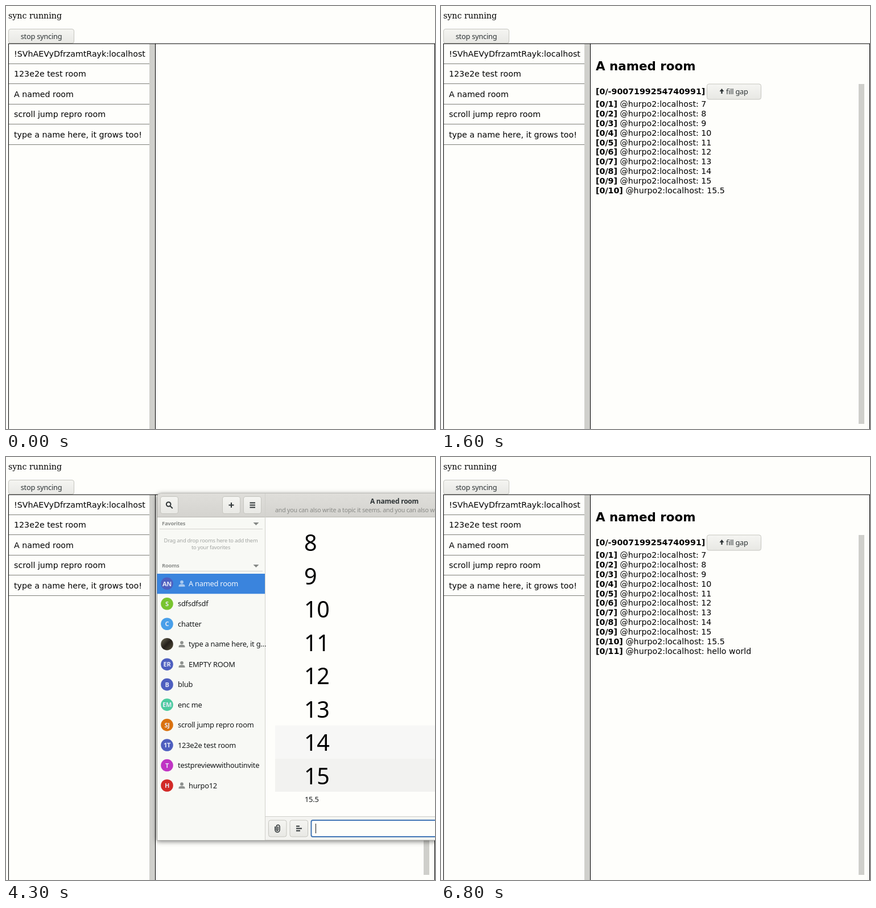
Animation, 754 px wide and 743 px high, one loop 8 s. Source, as an HTML page:

```html
<!DOCTYPE html>
<html lang="en">
<head>
<meta charset="utf-8">
<title>Room sync demo</title>
<style>
  html, body { margin: 0; width: 100%; height: 100%; overflow: hidden; background: #fefefb; }
  svg { display: block; width: 754px; height: 743px; }
  text { white-space: pre; }
  .page { font: 14.22px "DejaVu Sans", sans-serif; }
  .serif { font-family: "DejaVu Serif", serif; }
  .ui { font: 12.85px "Noto Sans", sans-serif; letter-spacing: -.018em; fill: #16191a; }
  .bold { font-weight: bold; }
  .mid { text-anchor: middle; }
  .shade { filter: drop-shadow(0 2.5px 4px rgba(0, 0, 0, .5)); }
  .icon { fill: none; stroke: #2e3436; stroke-width: 2; }
</style>
</head>
<body>
<svg id="stage" viewBox="0 0 754 743">
  <defs>
    <linearGradient id="face" x2="0" y2="1"><stop stop-color="#f5f5f2"/><stop offset="1" stop-color="#e8e8e4"/></linearGradient>
    <linearGradient id="bar" x2="0" y2="1"><stop stop-color="#dfdeda"/><stop offset="1" stop-color="#d4d3cf"/></linearGradient>
    <linearGradient id="photo" x2="1" y2="1"><stop stop-color="#6d6a55"/><stop offset=".5" stop-color="#26211c"/><stop offset="1" stop-color="#57523c"/></linearGradient>
    <clipPath id="messageArea"><path d="M456 106H754V631H456Z"/></clipPath>
  </defs>
</svg>
<script>
const LOOP = 8000;
const stage = document.getElementById('stage');

const rect = (x, y, w, h, fill, extra = '') =>
  `<rect x="${x}" y="${y}" width="${w}" height="${h}" fill="${fill}" ${extra}/>`;
const text = (x, y, content, cls = '', extra = '') =>
  `<text x="${x}" y="${y}" class="${cls}" ${extra}>${content}</text>`;
const size = (px, fill = '#16191a') => `style="font-size:${px}px;fill:${fill}"`;
const button = (x, y, w, h) =>
  rect(x + .5, y + .5, w - 1, h - 1, 'url(#face)', 'rx="3.5" stroke="#c5c5bf"');
const icon = d => `<path class="icon" d="${d}"/>`;
const group = (id, content, extra = '') => `<g id="${id}" ${extra}>${content}</g>`;

function page() {
  const rooms = ['!SVhAEVyDfrzamtRayk:localhost', '123e2e test room', 'A named room',
    'scroll jump repro room', 'type a name here, it grows too!'];
  return text(4, 22, 'sync running', 'serif') +
    button(4, 40, 116, 26) + text(62, 57.5, 'stop syncing', 'ui mid', size(12.8, '#2e3436')) +
    rooms.map((name, i) => text(14, 88.5 + 35.5 * i, name) +
      rect(5, Math.floor(101 + 35.5 * i), 247, 1, '#7e7f79')).join('') +
    rect(252, 67, 10, 676, '#cfcfcb') +
    rect(4, 65.7, 750, 1, '#000') +
    [4, 262, 753].map(x => rect(x, 66, 1, 677, '#000')).join('');
}

function timeline() {
  const bodies = ['7', '8', '9', '10', '11', '12', '13', '14', '15', '15.5', 'hello world'];
  const lines = bodies.map((body, i) => text(272, 177 + 16.88 * i,
    `<tspan class="bold">[0/${i + 1}]</tspan> @hurpo2:localhost: ${body}`, '',
    i === 10 ? 'id="newLine"' : ''));
  return text(272, 113, 'A named room', 'bold', 'font-size="21.4"') +
    text(272, 154.5, '[0/-9007199254740991]', 'bold') +
    button(467, 136.5, 96, 28) +
    '<path d="M493.5 145l4 5h-2.8v4h-2.4v-4h-2.8z" fill="#2e3436"/>' +
    text(501, 154.5, 'fill gap', 'ui', size(12.8, '#2e3436')) +
    rect(734, 137, 10, 597, '#cfcfcb') + lines.join('');
}

function sidebar() {
  const indigo = '#4e5fbf';
  const rooms = [
    ['AN', indigo, 'A named room', true], ['S', '#78c42e', 'sdfsdfsdf'],
    ['C', '#489fe9', 'chatter'], ['', 'url(#photo)', 'type a name here, it g…', true],
    ['ER', indigo, 'EMPTY ROOM', true], ['B', indigo, 'blub'], ['EM', '#4ccb9f', 'enc me'],
    ['SJ', '#da7210', 'scroll jump repro room'], ['1T', indigo, '123e2e test room'],
    ['T', '#c035c4', 'testpreviewwithoutinvite'], ['H', '#d22a27', 'hurpo12', true]];
  const section = (y, label) =>
    text(274, y + 4, label, 'bold', size(9.4, '#8b8e8b')) +
    rect(270, y + 10, 181, 1, '#d3d3ce') +
    `<path d="M434.5 ${y - 1}h10l-5 5z" fill="#858886"/>`;
  const room = ([initials, color, name, direct], i) => {
    const y = 222.3 + 35.47 * i;
    const person = `<path transform="translate(309 ${y})" fill="${i ? '#8e918e' : '#a9c9ef'}"
      d="M0-5.5a2.9 2.9 0 0 1 0 5.8a2.9 2.9 0 0 1 0-5.8M-5.5 5.5V4Q-5.5 1 0 1T5.5 4V5.5Z"/>`;
    return `<circle cx="283" cy="${y}" r="10.8" fill="${color}"/>` +
      text(283, y + 4.2, initials, 'bold mid', size(11, '#e6e9f6')) +
      (direct ? person : '') +
      text(direct ? 321 : 302, y + 4.5, name, '', i ? '' : size(12.85, '#f1f6fc'));
  };
  return section(116, 'Favorites') +
    text(360, 150, 'Drag and drop rooms here to add them', 'mid', size(9.35, '#a2a5a2')) +
    text(360, 162, 'to your favorites', 'mid', size(9.35, '#a2a5a2')) +
    section(190, 'Rooms') +
    rect(265.5, 205, 189.5, 35.3, '#3a84dd', 'id="selection"') +
    rooms.map(room).join('');
}

function messages() {
  let out = rect(473, 471.5, 281, 58, '#f7f7f6', 'id="hover14"') +
    rect(473, 529.7, 281, 58.3, '#f2f2f0', 'id="hover15"');
  for (let i = 0; i < 8; i++) out += text(524, 165 + 58.5 * i, 8 + i, '', size(39.5, '#000'));
  out += text(525, 606, '15.5') + text(525, 633.5, 'hello world', '', 'id="sent"');
  return `<g clip-path="url(#messageArea)">${group('messages', out)}</g>`;
}

function chatWindow() {
  return '<path class="shade" d="M265.5 673V71Q265.5 64 273 64H790V673Z" fill="#fefefb" stroke="#a3a39e"/>' +
    rect(266, 106, 189, 567, '#f8f9f5') +
    '<path d="M266 105.5V71Q266 64 273 64H754V105.5Z" fill="url(#bar)"/>' +
    rect(266, 105, 488, 1, '#b9b8b2') +
    rect(455, 64, 1, 609, '#d0d0cb') +
    [271, 380, 417].map(x => button(x, 69, 32, 31)).join('') +
    icon('M288.6 86.1l4.2 4.2M289.5 83a3.8 3.8 0 1 1-7.6 0a3.8 3.8 0 1 1 7.6 0') +
    icon('M391.5 84.5h9M396 80v9') +
    icon('M428.5 80.5h9.5M428.5 84.5h9.5M428.5 88.5h9.5') +
    text(682.5, 81.5, 'A named room', 'bold mid', size(12, '#2e3436')) +
    text(473, 97, 'and you can also write a topic it seems. and you can also write', '', size(10.7, '#898a86')) +
    sidebar() + messages() +
    rect(456, 631, 298, 41.5, '#f4f4f1') + rect(456, 631, 298, 1, '#d0d0cb') +
    [461, 498.5].map(x => button(x, 637.5, 32.5, 30)).join('') +
    '<path class="icon" style="stroke-width:1.6" d="M478 649v6a1.3 1.3 0 0 1-2.6 0v-6a2.8 2.8 0 0 1 5.6 0v6a4 4 0 0 1-8 0v-6"/>' +
    icon('M510 648.5h6M510 652.5h10M510 656.5h7') +
    rect(536.5, 638, 240, 29, '#fefefb', 'id="entry" rx="3"') +
    text(544, 657, '', '', 'id="typed"') +
    rect(544, 644, 1, 17, '#16191a', 'id="caret"');
}

function switcher() {
  const label = (x, name) => text(x, 409, name, 'mid', size(12.8, '#e2e4e1'));
  return rect(101.5, 292.5, 700, 138, '#2e3436', 'rx="10" stroke="#3f4546"') +
    rect(359, 304, 116, 115, '#1c5399', 'rx="3"') +
    '<circle cx="171" cy="352" r="39" fill="#ec6a2b"/>' +
    '<circle cx="293.5" cy="353" r="43" fill="#df760f"/>' +
    rect(381, 317, 72, 72, '#74cbf6') +
    rect(497, 310, 85, 85, '#484543') +
    rect(632, 321, 62, 62, '#cb1f36') +
    rect(751, 319, 10, 68, '#e6e6e3', 'rx="3"') +
    label(171, 'Firefox') + label(293.5, 'Peek') + label(417, 'Fractal') +
    label(539.5, 'Dulvine Text') + label(663, 'gitg');
}

stage.insertAdjacentHTML('beforeend',
  group('page', page(), 'class="page"') +
  group('timeline', timeline(), 'class="page"') +
  group('chat', chatWindow(), 'class="ui"') +
  group('switcher', switcher(), 'class="ui"'));

const $ = id => document.getElementById(id);
const show = (id, visible) => $(id).style.display = visible ? '' : 'none';
const between = (t, start, end) => t >= start && t < end;
const clamp = v => Math.max(0, Math.min(1, v));

// Times at which each further character has been typed.
const keyTimes = [4800, 4900, 5100, 5200, 5300, 5500, 5600, 5800, 5900, 5900, 6000];

function switcherOpacity(t) {
  if (between(t, 500, 600) || between(t, 3200, 3500)) return 1;
  if (between(t, 600, 700) || between(t, 3500, 3600)) return .6;
  return between(t, 3600, 3700) ? .25 : 0;
}

function render(t) {
  const second = t >= 3500;
  const sent = t >= 6200;
  const focused = second || t < 900;

  show('timeline', t >= 1600);
  show('newLine', t >= 6800);
  show('chat', between(t, 600, 1100) || between(t, 3500, 6800));
  const opacity = switcherOpacity(t);
  show('switcher', opacity > 0);
  $('switcher').style.opacity = opacity;

  show('hover14', second && t < 4500);
  show('hover15', second);
  show('sent', sent);
  const scroll = 27.5 * clamp((t - 6100) / 300) * sent;
  $('messages').setAttribute('transform', `translate(0 ${-scroll})`);
  $('selection').style.opacity = between(t, 6300, 6400) ? .85 : 1;

  $('entry').setAttribute('stroke', focused ? '#4276b5' : '#cbcbc5');
  $('entry').setAttribute('stroke-width', focused ? 2 : 1);
  const count = sent ? 0 : keyTimes.filter(time => time <= t).length;
  $('typed').textContent = 'hello world'.slice(0, count);
  const width = count ? $('typed').getComputedTextLength() : 0;
  $('caret').setAttribute('x', Math.round(544 + width));
  show('caret', focused && !between(t, 4100, 4300));
}

function tick(now) {
  render(now % LOOP);
  requestAnimationFrame(tick);
}
render(0);
requestAnimationFrame(tick);
</script>
</body>
</html>
```
